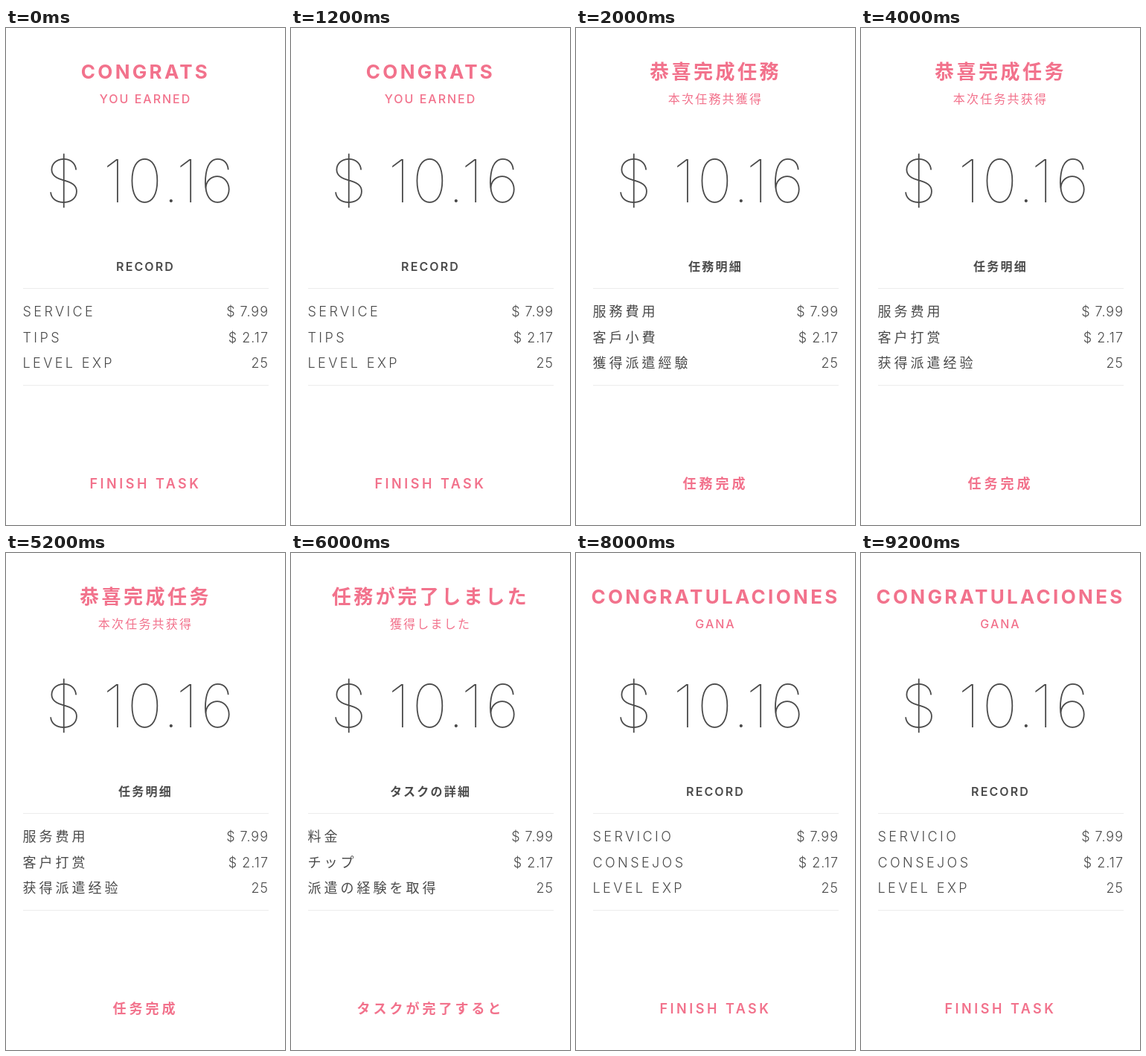
An HTML page that plays this animation: 375 px wide and 667 px high, repeating every 10 s.

```html
<!DOCTYPE html>
<html lang="en">
<head>
<meta charset="utf-8">
<title>Task summary</title>
<style>
  html, body { margin: 0; width: 100%; height: 100%; overflow: hidden; background: #fff; }
  svg { display: block; width: 375px; height: 667px; }
  text { font-family: Inter, "Noto Sans CJK TC", sans-serif; fill: #4a4a4a; white-space: pre; }
  :lang(zh-Hans) text { font-family: "Noto Sans CJK SC", sans-serif; }
  :lang(ja) text { font-family: "Noto Sans CJK JP", sans-serif; }
  .title, .sub, .head, .button { text-anchor: middle; }
  .title { font-size: 26px; font-weight: 700; letter-spacing: 3.3px; }
  .sub { font-size: 16px; font-weight: 500; letter-spacing: 2px; }
  .head { font-size: 16px; font-weight: 600; letter-spacing: 2.1px; }
  .button { font-size: 18px; font-weight: 600; letter-spacing: 3.5px; }
  .title, .sub, .button { fill: #f2728c; }
  .row { font-size: 18px; font-weight: 300; letter-spacing: 3.4px; }
  .value { font-size: 18px; font-weight: 300; letter-spacing: 1px; text-anchor: end; }
  .amount { font-size: 80px; font-weight: 100; letter-spacing: 3px; }
  .cjk .title { letter-spacing: 3.5px; }
  .cjk .sub, .cjk .head { letter-spacing: 2.2px; }
  .cjk .sub { font-weight: 500; }
  .cjk .row, .cjk .button { letter-spacing: 4px; }
  .page { visibility: hidden; animation: show 10s step-end infinite; animation-delay: calc(var(--i) * 2s - 10s); }
  @keyframes show {
    0% { visibility: visible; }
    20%, 100% { visibility: hidden; }
  }
</style>
</head>
<body>
<svg viewBox="0 0 375 667">
  <path d="M23 349.5H353M23 479.5H353" stroke="#ececec"/>
  <text class="amount" x="53" y="234">$ 10.16</text>
  <text class="value" x="353" y="387">$ 7.99</text>
  <text class="value" x="353" y="422">$ 2.17</text>
  <text class="value" x="353" y="456">25</text>
</svg>
<script>
  // Each page: language, title, subtitle, heading, three rows, button
  const pages = [
    ["en", "CONGRATS", "YOU EARNED", "RECORD", "SERVICE", "TIPS", "LEVEL EXP", "FINISH TASK"],
    ["zh-Hant", "恭喜完成任務", "本次任務共獲得", "任務明細", "服務費用", "客戶小費", "獲得派遣經驗", "任務完成"],
    ["zh-Hans", "恭喜完成任务", "本次任务共获得", "任务明细", "服务费用", "客户打赏", "获得派遣经验", "任务完成"],
    ["ja", "任務が完了しました", "獲得しました", "タスクの詳細", "料金", "チップ", "派遣の経験を取得", "タスクが完了すると"],
    ["es", "CONGRATULACIONES", "GANA", "RECORD", "SERVICIO", "CONSEJOS", "LEVEL EXP", "FINISH TASK"]
  ];
  const slots = [
    ["title", 187.5, 68], ["sub", 187.5, 101], ["head", 187.5, 326],
    ["row", 22.5, 387], ["row", 22.5, 422], ["row", 22.5, 456], ["button", 187.5, 618]
  ];
  const svg = document.querySelector("svg");
  const add = (parent, tag, attrs) => {
    const el = parent.appendChild(document.createElementNS("http://www.w3.org/2000/svg", tag));
    for (const key in attrs) el.setAttribute(key, attrs[key]);
    return el;
  };

  pages.forEach(([lang, ...lines], i) => {
    const cjk = /zh|ja/.test(lang) ? " cjk" : "";
    const page = add(svg, "g", { lang, class: "page" + cjk, style: `--i:${i}` });
    lines.forEach((line, n) => {
      const [name, x, y] = slots[n];
      add(page, "text", { class: name, x, y }).textContent = line;
    });
  });
</script>
</body>
</html>
```
